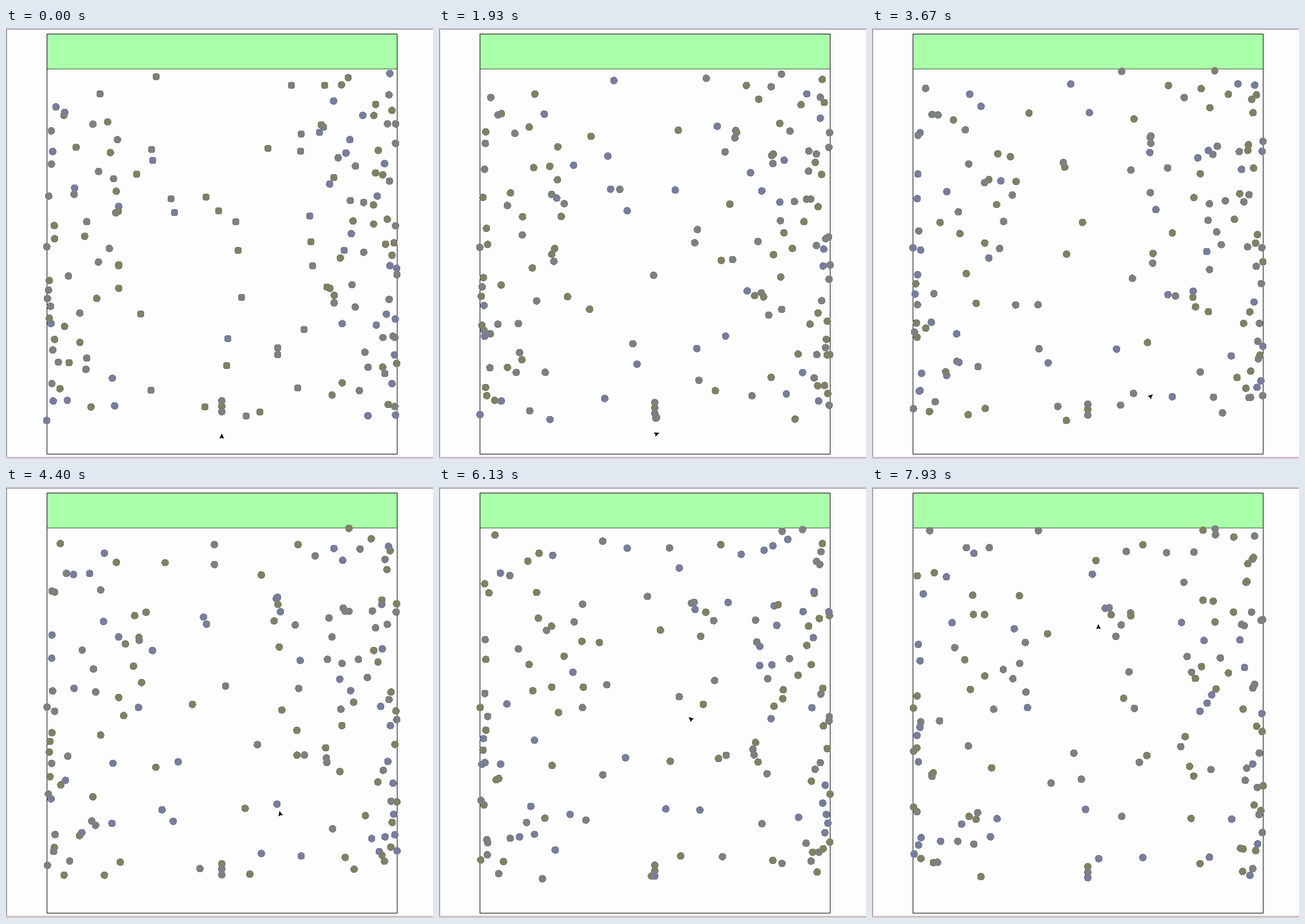
Animation of 745x752 px, one loop 8 s. Source, as a matplotlib script:

```python
import numpy as np
import matplotlib.pyplot as plt
from matplotlib.animation import FuncAnimation
from matplotlib.patches import Polygon, Rectangle

W, H, DPI = 745, 752, 100
FRAMES, LOOP = 120, 8000
LEFT, RIGHT, TOP, FLOOR = 71, 682.5, 72, 685
TINTS = np.array([[0.49, 0.50, 0.50], [0.50, 0.50, 0.40], [0.47, 0.49, 0.61]])

# Dots crossing the open middle: x, y, and velocity in pixels per second
MIDDLE = np.array([
    (262, 85, 23.1, 3.5), (498, 100, -17, -6.6), (556, 100, -10.6, 0.1),
    (515, 185, -15.8, -7.2), (457, 210, -21.2, -17), (550, 169, -17.3, 5.3),
    (554, 173, -18.7, 4.9), (547, 182, -16.5, 5.2), (514, 215, -8, 0.6),
    (593, 218, -5.5, 9.9), (572, 261, -15.3, -4.6), (530, 328, -12.1, -11.1),
    (535, 415, -12.2, -5.9), (560, 452, -11.9, 3.6), (532, 373, -21.2, 17.4),
    (405, 388, 24.6, -19.4), (401, 338, 24.2, 19.7), (371, 319, 22, -19.4),
    (349, 295, -26.6, -7.4), (294, 322, 11.5, -21.6), (288, 298, 21.6, 11.2),
    (228, 255, 3.7, -8.3), (411, 470, -19.5, -20.6), (387, 542, -26.1, 4.8),
    (385, 589, -21.2, -1.3), (474, 558, -12.9, 0.6), (474, 570, -11, 24),
    (509, 628, -14.4, 2.6), (520, 526, -10.7, 6.2), (443, 670, -16, 16),
    (419, 677, -21.8, 2.1), (347, 661, 17.5, 10), (253, 632, 19.4, 7.7),
    (235, 499, 14.9, -4.4), (254, 212, 21.8, 6.2), (256, 231, 4.9, -22.5),
    (590, 388, -18, -8.3),
])
STACK = np.array([(376.5, 650.5 + 9.5 * i, 0, 1.55) for i in range(3)])

# Arrow: time, x, y, heading in degrees
ROUTE = np.array([
    (0, 376.5, 712, 90), (1.8, 376.5, 712, 90), (1.93, 384, 704, -45),
    (3.67, 487, 642, 42), (5, 471, 510, 155), (6.13, 437, 398, 137),
    (7.93, 393.5, 238, 90),
])
ARROW = np.array([(4.5, 0), (-4.5, 4), (-3, 0), (-4.5, -4)])


def crowd(rng, count, reach, top):
    """Dots near a wall: depth from it, y, inward drift, vertical drift."""
    depth = reach * rng.random(count) ** 1.7
    y = rng.permutation(np.linspace(top, 682, count)) + rng.normal(0, 6, count)
    vx = depth * rng.uniform(-0.01, 0.11, count) + rng.normal(0, 0.8, count)
    return np.column_stack([depth, y, vx, rng.normal(0, 6, count)])


def advance(dots, t):
    return dots[:, :2] + dots[:, 2:] * t


def fold(y):
    """Reflect y between the green strip and the floor."""
    span = FLOOR - TOP
    return TOP + span - np.abs((y - TOP) % (2 * span) - span)


rng = np.random.default_rng(12)
LEFT_CROWD = crowd(rng, 56, 138, 125)
RIGHT_CROWD = crowd(rng, 66, 125, 85)


def positions(t):
    free = advance(np.vstack([MIDDLE, STACK]), t)
    x, y = free.T
    free = free[(x >= LEFT) & (x <= RIGHT) & (y >= TOP) & (y <= FLOOR)]
    left, right = advance(LEFT_CROWD, t), advance(RIGHT_CROWD, t)
    left[:, 0] = LEFT + np.abs(left[:, 0])
    right[:, 0] = RIGHT - np.abs(right[:, 0])
    sides = np.vstack([left, right])
    sides[:, 1] = fold(sides[:, 1])
    return np.vstack([free, sides])


def tints(xy):
    """The shade of a dot depends on the pixel under its centre."""
    x, y = np.rint(xy).astype(int).T
    key = (x * 37 + y * 61 + x * y * 7) % 20
    return TINTS[np.digitize(key, [9, 15])]


def arrow_points(t):
    x, y, angle = (np.interp(t, ROUTE[:, 0], col) for col in ROUTE[:, 1:].T)
    c, s = np.cos(np.radians(angle)), np.sin(np.radians(angle))
    u, v = ARROW.T
    return np.column_stack([x + c * u - s * v, y - s * u - c * v])


fig = plt.figure(figsize=(W / DPI, H / DPI), dpi=DPI, facecolor="#fdfdfd")
ax = fig.add_axes([0, 0, 1, 1])
ax.set(xlim=(0, W), ylim=(H, 0))
ax.axis("off")


def bar(x, y, w, h, color):
    ax.add_patch(Rectangle((x, y), w, h, fc=color, lw=0, aa=False))


bar(0, 0, W, 1, "#e8e4dc")
bar(0, 1, W, 2, "#aaa4b8")
bar(0, 1, 2, 749, "#a8a4a4")
bar(0, 748, W, 2, "#d8c8e0")
bar(0, 750, W, 1, "#a89888")
bar(71, 11, 612, 61, "#aaffaa")
bar(71, 71, 612, 1, "#226622")
for y in (10, 743):
    bar(71, y, 612, 1, "black")
for x in (71, 682):
    bar(x, 10, 1, 734, "black")

dots = ax.scatter([], [], s=(12 * 72 / DPI) ** 2, linewidths=0,
                  antialiased=False, zorder=3)
arrow = ax.add_patch(Polygon(arrow_points(0), fc="black", lw=0, zorder=4))


def draw(frame):
    t = frame * LOOP / FRAMES / 1000
    xy = positions(t)
    dots.set_offsets(xy)
    dots.set_facecolors(tints(xy))
    arrow.set_xy(arrow_points(t))
    return dots, arrow


anim = FuncAnimation(fig, draw, frames=FRAMES, interval=LOOP / FRAMES,
                     repeat=True, repeat_delay=0)
plt.show()
```
